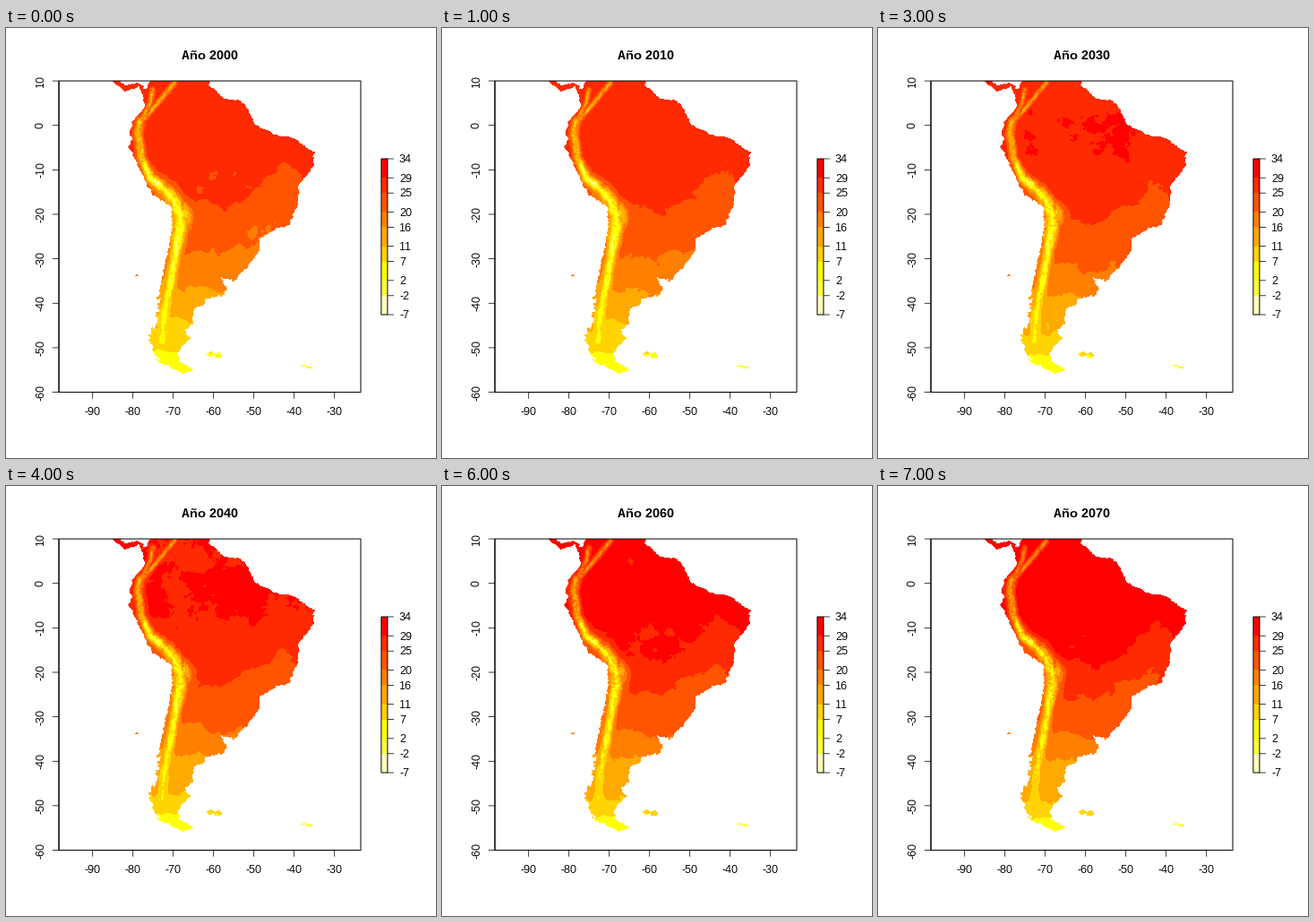
A matplotlib script for the animation above (8000 ms loop, 480 px wide and 480 px high).

```python
import numpy as np
import matplotlib.pyplot as plt
from matplotlib.animation import FuncAnimation
from matplotlib.path import Path
from matplotlib.patches import Rectangle

SIZE, DPI = 480, 80
PT = 72 / DPI
LEFT, RIGHT, TOP, BOTTOM = 59.04, 396, 59.04, 406.56
BREAKS = np.round(np.linspace(-7, 34, 10)).astype(int)
# Pale yellow to yellow, then yellow to red
COLORS = np.array([(1, 1, .75), (1, 1, .25)] + [(1, i / 6, 0) for i in range(6, -1, -1)])

# Coastline key points as (longitude, latitude)
PACIFIC = [(-85.8, 10.4), (-83, 8.2), (-81, 7.5), (-80.3, 8.2), (-78.7, 8.9),
           (-77.4, 6.5), (-77.2, 3.9), (-80, .8), (-81, -2), (-79.9, -2.8),
           (-81.2, -5), (-79.2, -8), (-76.3, -13.8), (-75, -15.5),
           (-70.4, -18.4), (-70.2, -22), (-71.6, -30), (-73.5, -37.3),
           (-74, -43.5), (-75.6, -47), (-74.6, -52), (-71.8, -54.2), (-67.4, -55.8)]
ATLANTIC = [(-65, -54.8), (-68.2, -53.2), (-69, -50.8), (-65.8, -47.8),
            (-67.4, -46), (-65.3, -44.5), (-64.8, -41.2), (-62.2, -40.4),
            (-62, -39), (-57.6, -38.1), (-56.8, -36.5), (-58.3, -34.3),
            (-54.8, -34.9), (-50.4, -30.4), (-48.6, -28), (-48.5, -25.6),
            (-45, -23.4), (-41.2, -22.4), (-39.2, -18), (-38.8, -13.2),
            (-35.5, -9.7), (-34.9, -6), (-37, -4.9), (-40, -2.8), (-44.5, -2.2),
            (-49.8, .3), (-51.7, 4.1), (-54, 5.8), (-57.2, 6), (-61, 9), (-61.2, 10.4)]
CARIBBEAN = [(-75.5, 10.4), (-76.6, 8.1), (-79, 9.5), (-82, 8.9), (-83.1, 10.4)]
# (x, y, half width, half height)
ISLANDS = [(228.8, 364.3, 4, 2.4), (237, 365.6, 4.6, 3), (332, 377.2, 3, .9),
           (338, 379.4, 3.2, 1.2), (146, 276, 1.7, 1)]

# Mountain axes in pixels
ANDES = [(150, 104), (147.5, 120), (151.5, 145), (162, 167), (184, 185),
         (198, 208), (190, 250), (185, 278), (177, 320), (174, 350)]
BRANCHES = [[(150, 106), (161, 83), (164, 68)],
            [(152, 104), (171, 82), (188, 61)]]

# Local warm and cool areas: (x, y, x spread, y spread, degrees)
AREAS = [(237, 114, 14, 14, .6), (277, 140, 8, 20, .7), (190, 122, 10, 20, -.5),
         (213, 85, 10, 7, -1.2), (232, 164, 14, 7, -.7), (243, 200, 12, 16, 1.2),
         (315, 170, 15, 22, -1.8), (288, 222, 20, 16, -2.4)]

rng = np.random.default_rng(12)
Y, X = np.mgrid[0:SIZE, 0:SIZE] + .5


def noise(sx, sy=None):
    """Smooth random field with unit deviation."""
    f = np.fft.fftfreq(SIZE)
    reach = ((sy or sx) * f[:, None]) ** 2 + (sx * f) ** 2
    blur = np.exp(-2 * np.pi ** 2 * reach)
    field = np.fft.ifft2(np.fft.fft2(rng.normal(size=(SIZE, SIZE))) * blur).real
    return field / field.std()


def bell(v, center, spread):
    return np.exp(-((v - center) / spread) ** 2 / 2)


def lon_x(lon):
    return 186.7 + 4.5 * (np.asarray(lon) + 70)


def lat_y(lat):
    return TOP + (10 - np.asarray(lat)) * (BOTTOM - TOP) / 70


def land_mask():
    lon, lat = np.array(PACIFIC + ATLANTIC + CARIBBEAN).T
    outline = Path(np.column_stack([lon_x(lon), lat_y(lat)]))
    fjords = (Y > 300) & (X < 182)
    rough = np.where(fjords, 1.4, .6)
    px, py = X + rough * noise(1.1), Y + rough * noise(1.1)
    land = outline.contains_points(np.column_stack([px.ravel(), py.ravel()]))
    land = land.reshape(X.shape)
    for cx, cy, rx, ry in ISLANDS:
        land |= np.hypot((px - cx) / rx, (py - cy) / ry) < 1
    return land & (X > LEFT) & (X < RIGHT) & (Y > TOP)


def ridge(points):
    """Distance to an axis, height along it and the cells lying west of it."""
    p = np.array(points, float)
    run = np.r_[0, np.cumsum(np.hypot(*np.diff(p, axis=0).T))]
    s = np.arange(0, run[-1], 2)
    lx, ly = (np.interp(s, run, col) for col in p.T)
    tx, ty = np.gradient(lx), np.gradient(ly)
    near, best = np.full(X.shape, 1e9), np.zeros(X.shape, int)
    for i in range(len(s)):
        d = (X - lx[i]) ** 2 + (Y - ly[i]) ** 2
        closer = d < near
        near[closer], best[closer] = d[closer], i
    west = tx[best] * (Y - ly[best]) > ty[best] * (X - lx[best])
    return np.sqrt(near), ly[best], west


def base_temperature():
    south = np.maximum(Y - 130, 0) / 123
    temp = 26.7 - 7 * south ** 1.65
    for cx, cy, sx, sy, deg in AREAS:
        temp += deg * bell(X, cx, sx) * bell(Y, cy, sy)
    temp += .35 * noise(8) + .2 * noise(3) + .12 * noise(1.2)

    dist, along, west = ridge(ANDES)
    plateau = bell(along, 212, 17)
    width = 4.2 + 5.5 * plateau + 1.5 * bell(along, 175, 12)
    drop = np.interp(along, [110, 160, 265, 320, 350], [16, 20, 18, 6, 4])
    drop = (drop - 3 * plateau) * np.exp(-(dist / width) ** 2)
    for branch in BRANCHES:
        drop = np.maximum(drop, 13 * np.exp(-(ridge(branch)[0] / 2.6) ** 2))
    temp -= west * 4.5 * bell(Y, 205, 40)
    return temp - drop * (1 + .15 * noise(1.2, 4) + .1 * noise(.8))


LAND = land_mask()
BASE = base_temperature()
# The tropics warm faster than the south
WARMING = 4.2 - 2 / (1 + np.exp((262 - Y) / 10))


def climate(step):
    temp = BASE + WARMING * step / 7
    band = np.clip(np.digitize(temp, BREAKS) - 1, 0, len(COLORS) - 1)
    rgb = COLORS[band]
    rgb[~LAND] = 1
    return rgb


plt.rcParams.update({"font.family": "Liberation Sans",
                     "text.hinting": "native", "text.hinting_factor": 1})
fig = plt.figure(figsize=(SIZE / DPI, SIZE / DPI), dpi=DPI, facecolor="white")
ax = fig.add_axes([0, 0, 1, 1])
picture = ax.imshow(climate(0), extent=(0, SIZE, SIZE, 0),
                    interpolation="nearest", aspect="auto")
ax.set(xlim=(0, SIZE), ylim=(SIZE, 0))
ax.axis("off")


def stroke(xs, ys, width=1):
    ax.plot(xs, ys, color="black", lw=width * PT, snap=False,
            solid_capstyle="butt")


def box(x0, x1, y0, y1):
    ax.add_patch(Rectangle((x0, y0), x1 - x0, y1 - y0, fill=False,
                           ec="black", lw=PT, snap=False))


def label(x, y, text, size=12, **style):
    return ax.text(x, y, text, fontsize=size * PT, va="baseline", **style)


def draw_axes():
    box(LEFT, RIGHT, TOP, BOTTOM)
    stroke([LEFT, LEFT], [TOP, BOTTOM])
    stroke([lon_x(-90), lon_x(-30)], [BOTTOM, BOTTOM])
    for lon in range(-90, -20, 10):
        x = lon_x(lon)
        stroke([x, x], [BOTTOM, BOTTOM + 7.2], .75)
        label(x, 432, str(lon), ha="center")
    for lat in range(10, -70, -10):
        y = lat_y(lat)
        stroke([LEFT - 7.2, LEFT], [y, y], .75)
        label(42, y, str(lat), ha="center", rotation=90, rotation_mode="anchor")


def draw_legend():
    x0, x1, y0, y1 = 418.9, 425.9, 146, 320
    level = np.interp(BREAKS, [BREAKS[0], BREAKS[-1]], [y1, y0])
    for low, high, color in zip(level, level[1:], COLORS):
        ax.add_patch(Rectangle((x0, high), x1 - x0, low - high,
                               fc=color, ec="none", lw=0))
    box(x0, x1, y0, y1)
    for value, y in zip(BREAKS, level):
        stroke([x1, x1 + 7], [y, y], .75)
        label(439, y + 4.3, str(value), ha="left")


draw_axes()
draw_legend()
title = label(227.3, 35, "Año 2000", size=14.4, ha="center", weight="bold")


def update(step):
    picture.set_data(climate(step))
    title.set_text(f"Año {2000 + 10 * step}")
    return picture, title


anim = FuncAnimation(fig, update, frames=8, interval=1000, repeat=True)
plt.show()
```
